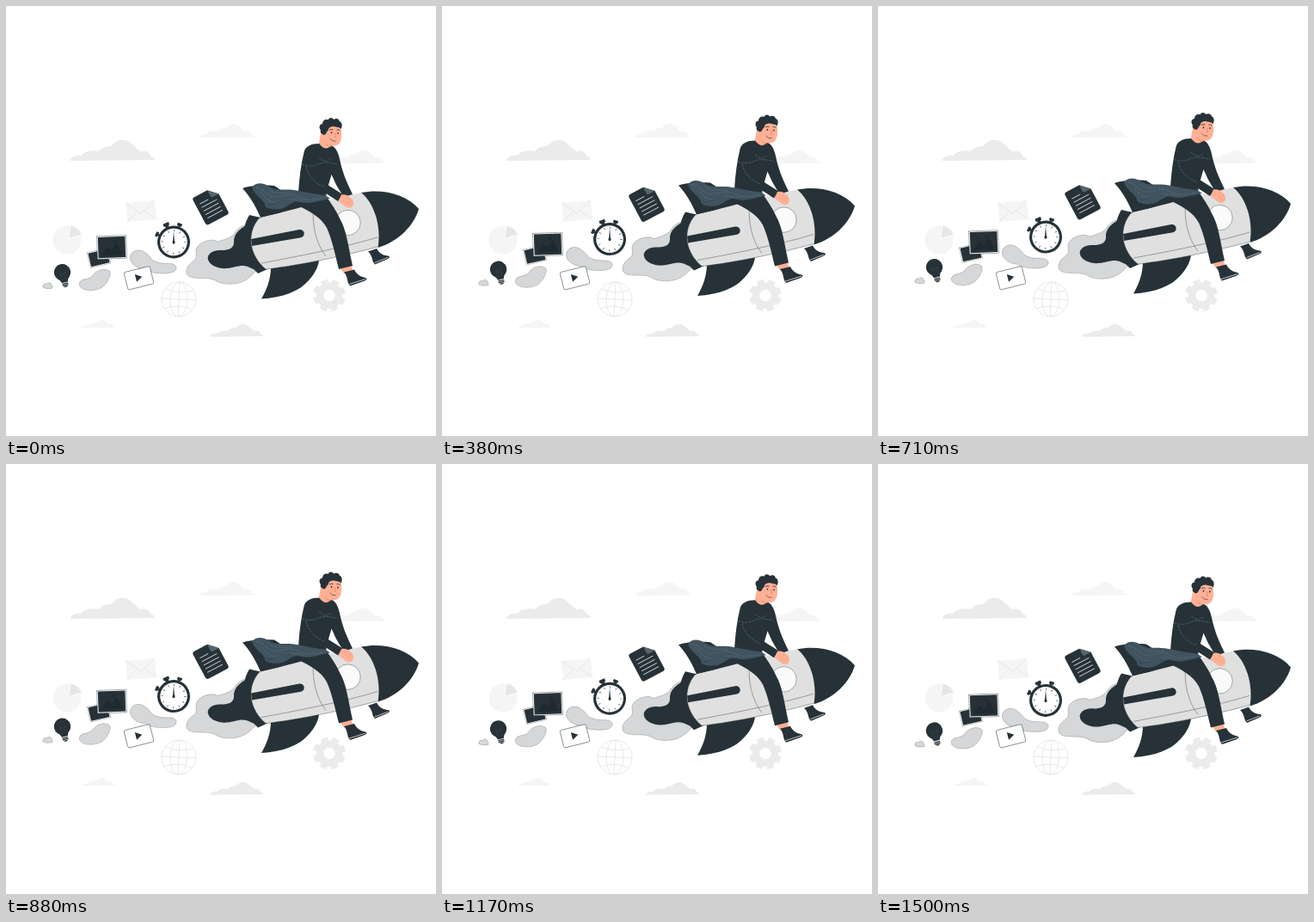
An HTML page for the animation above (1.54 s loop, 500x500 px).

```html
<!DOCTYPE html>
<html lang="en">
<head>
<meta charset="utf-8">
<title>Rocket ride</title>
<style>
  html, body { margin: 0; width: 100%; height: 100%; overflow: hidden; background: #fff; }
  svg { display: block; width: 100%; height: 100%; }
  .dark { fill: #263238; }
  .smoke { fill: #d6d7d8; stroke: #263238; stroke-width: .3; stroke-dasharray: 2 .6; }
  .body { fill: #e0e0e0; }
  .skin { fill: #ffb094; }
  .line { fill: none; stroke: #263238; stroke-width: .4; }
  .pale { fill: none; stroke: #fff; stroke-width: .7; }
  .seam { fill: none; stroke: #8b9ba3; stroke-width: .4; stroke-dasharray: 3 1.2; }
  .faint { fill: none; stroke: #e0e0e0; stroke-width: .7; }
</style>
</head>
<body>
<svg viewBox="0 0 500 500">
  <defs>
    <path id="cloud" d="M0 24C1 20 6 17 13 18C16 13 26 11 34 13C38 6 46 8 49 6C55-2 67-2 72 5C77 8 79 12 82 13C89 11 93 15 94 19C97 19 98 21 98 23Z"/>
  </defs>

  <g id="still">
    <use href="#cloud" transform="translate(74.5 156)" fill="#ebebeb"/>
    <use href="#cloud" transform="translate(224 137.2) scale(.66)" fill="#f5f5f5"/>
    <use href="#cloud" transform="translate(375 167.5) scale(.66)" fill="#f5f5f5"/>
    <use href="#cloud" transform="translate(88 365) scale(.39)" fill="#f5f5f5"/>
    <use href="#cloud" transform="translate(237 370) scale(.63 .61)" fill="#ebebeb"/>

    <circle cx="71" cy="272" r="16.5" fill="#f5f5f5"/>
    <path d="M72.5 270.5L75 255Q85 257 88.500 266Z" fill="#e6e6e6" stroke="#fff"/>

    <path d="M139 229L173 226L175 248L141 251Z" fill="#f5f5f5"/>
    <path class="faint" d="M139 229L157 241L173 226M141 251L153 238M175 248L161 238"/>

    <g class="faint" transform="translate(201 341) rotate(3)">
      <circle r="20"/>
      <ellipse rx="10" ry="20"/>
      <path d="M0-20V20M-20 0H20M-16.500-11.500Q0-5 16.500-11.500M-16.500 11.500Q0 5 16.500 11.500"/>
    </g>

    <g transform="translate(376 336.500) rotate(10)" fill="none" stroke="#ebebeb">
      <circle r="11" stroke-width="8.500"/>
      <circle r="16.200" stroke-width="5.200" stroke-dasharray="7.700 5.023"/>
    </g>
  </g>

  <g id="ride">
    <path class="smoke" d="M43 327C42.500 323 46 322 47.500 323.500C49 320 54 322 54 328C52 329 45 329 43 327Z"/>
    <path class="smoke" d="M86 321C89 316 97 319 101 313C106 306 117 304 121 309C122 314 118 322 112 327C104 332 90 332 86 326C85 324 85 322 86 321Z"/>
    <path class="smoke" d="M145 290C147 283 157 282 162 287C169 291 168 296 176 298C185 301 194 297 198 303C199 309 192 311 184 311C174 311 168 310 162 306C152 306 142 298 145 290Z"/>
    <path class="smoke" d="M290 252C278 253 270 257 266 264C262 270 252 272 246 274C240 270 227 273 222 281C219 286 224 291 219 296C209 302 207 312 214 315C222 318 236 315 243 319C252 325 268 324 276 320C284 316 288 311 292 306Z"/>

    <g transform="translate(65.500 309.700) rotate(-14)">
      <circle class="dark" r="9.700"/>
      <path class="dark" d="M-6 6L-3.500 12H3.500L6 6Z"/>
      <path class="line" d="M-3.500 13.500H3.500M-3.500 15.300H3.500M-2 17H2" style="stroke-width:1.300"/>
      <path class="seam" d="M-2 9L-3 0L0 3L3 0L2 9" opacity=".4"/>
    </g>

    <g transform="translate(108 293) rotate(-13)">
      <rect x="-12" y="-9" width="24" height="18" fill="#fff" stroke="#263238" stroke-width=".4" stroke-dasharray="1.200 .6"/>
      <rect class="dark" x="-11" y="-8" width="22" height="16"/>
    </g>
    <g transform="translate(123 280.500) rotate(-2)">
      <rect x="-17" y="-13.300" width="34" height="26.600" fill="#fff" stroke="#263238" stroke-width=".6" stroke-dasharray="1.400 .7"/>
      <rect class="dark" x="-15.800" y="-12.100" width="31.600" height="24.200"/>
      <g fill="#1f2a30">
        <path d="M-13 9L-5-1L0 4L6-5L13 9Z"/>
        <circle cx="3" cy="-6.500" r="1.800"/>
      </g>
    </g>

    <g class="dark" transform="translate(195 274.500) rotate(-23)">
      <path d="M-3.500-24H3.500V-20.500H2V-17H-2V-20.500H-3.500Z"/>
      <path id="knob" d="M-2.800-23H2.800V-19.800H1.300V-17H-1.300V-19.800H-2.800Z" transform="rotate(-42)"/>
      <use href="#knob" transform="rotate(84)"/>
      <circle r="19"/>
      <circle r="15.800" fill="#fff"/>
      <circle r="13.200" fill="none" stroke="#263238" stroke-width="2.500" stroke-dasharray=".6 6.311" transform="rotate(23)"/>
      <g transform="rotate(23)">
        <path d="M0-12.500L1.200 2H-1.200Z"/>
        <circle r="1.600"/>
      </g>
    </g>

    <g transform="translate(238 232.500) rotate(-28)">
      <path class="dark" d="M-12-18H5L15-8V15Q15 18 12 18H-12Q-15 18-15 15V-15Q-15-18-12-18Z"/>
      <path d="M5-18L15-8H7Q5-8 5-10Z" fill="#56656d"/>
      <path class="pale" d="M-10-8H1M-10-3.300H10M-10 1.400H10M-10 6.100H10M-10 10.800H10"/>
    </g>

    <!-- rocket -->
    <path class="dark" d="M275 212C285 208.500 300 208 312 209L350 234L296 246C290 232 284 222 275 212Z"/>
    <path class="dark" d="M308 303C308 318 303 330 297 340.500C322 339 341 332 352 319C360 310 364 302 364.500 291Z"/>
    <path class="dark" d="M289 251C273 256 264 265 265 275C265 282 258 284 251 284C240 283 233 289 235 295C237 302 248 306 257 305C267 304 273 300 281 303L292 308Z"/>
    <path class="dark" d="M283 243L296 246L304 306L293 311C276 296 270 264 283 243Z"/>
    <path class="body" d="M294 247C330 238 380 223 414 217C428 228 437 254 432.500 280C400 289 340 302 302 306C283 290 279 265 294 247Z"/>
    <path class="dark" d="M413 217C438 212 466 219 480 236C474 256 456 274 432.500 281C437 254 427 228 413 217Z"/>
    <path class="line" d="M297 299C340 291 392 281 432 269M358 231C355 252 360 276 372 291M294 247C279 265 283 290 302 306C340 302 400 289 432 280"/>
    <path class="dark" d="M285 271L341 260A4.700 4.700 0 0 1 343 269.200L286 279Z"/>
    <circle cx="397.500" cy="252" r="14.700" fill="#fafafa" stroke="#263238" stroke-width=".4"/>

    <!-- back foot -->
    <path class="dark" d="M421 285.500L431 282C434 288 439 290 444 290.500C447 291 446 293.500 443 294.500L429 300.500C425 297 427 291 421 285.500Z"/>
    <path class="pale" d="M428.500 298.500L444 292.500"/>

    <!-- rider -->
    <path class="skin" d="M388 303.500L401 300L403.500 308L393 311Z"/>
    <path class="dark" d="M338 219C333 223 333 228 339 232C352 238 366 245 373 258C379 271 383 290 387 306L403 302C398 280 396 260 388 247C384 238 378 229 372 221Z"/>
    <path class="dark" d="M393 309.500L405 306.500C408 313 413 315 418 316C420.500 317 419.500 319 416 320L400 325.500C396 321 398 315 393 309.500Z"/>
    <path class="pale" d="M399 323.500L418 317.500"/>

    <path class="skin" d="M366.500 145L379 152L380 168Q370 172 363 164Z"/>
    <path class="dark" d="M364 160C355 160 348 163 346.500 170C343 184 341 200 340 217L345 220L372 222L373.500 213L378.500 196C382 203 384 210 393 222L403 219C396 205 391 193 388 178C386 169 383 164 378 162Q372 170 364 160Z"/>

    <!-- cloth -->
    <path d="M286 211C291 204 300 206 306 210C313 215 321 213 329 213.500C341 214 352 218 371 220L377 224C362 227 352 231 342 228C332 225 328 235 318 236C308 237 300 235 301 230C296 222 289 220 286 211Z" fill="#40545f"/>
    <path d="M291 211C301 212 304 223 314 222S330 217 340 222S358 225 370 223M297 217C303 224 309 230 318 228S332 223 344 226M305 213C314 220 324 216 334 218" fill="none" stroke="#78909c" stroke-width=".7" stroke-dasharray=".8 1.500"/>
    <path d="M303 231C312 233 320 225 330 226" class="line"/>

    <path class="dark" d="M345 180C345 195 352 205 363 212L386 227L391.500 219L374 208C368 201 365 192 363 183Z"/>
    <path class="seam" d="M344 184Q354 188 362 184T386 184M364 176Q372 184 378 177M349 187C352 200 360 206 371 211"/>
    <path class="skin" d="M390 219.500C396 218 402 222 404 228C405 233 400 237 395 233.500L386.500 227Z"/>
    <path d="M394 226L401 231M396 223L403 228" fill="none" stroke="#e98f76" stroke-width=".5"/>

    <path class="skin" d="M367 144L374 138L389 140C391 150 390.500 157 386.500 161C382 164 375 163 371 159C366 155 365 150 367 144Z"/>
    <path d="M371 158C372 161 376 163 379 163.200C375 165 371 162 371 158Z" fill="#ee9478"/>
    <path class="dark" d="M370 150C367 149 364.500 147 366 144.500C363 141 365 137 368 137C368 133 372 131 374.500 132.500C376 129 380 129.500 381 132C384 130 388 131.500 387.500 134C391 135 391.500 140 389.500 143C388 140.500 384 141 381 140C378 140 375 141 375 144C374 145 372.500 147 372 148.500Z"/>
    <path class="line" d="M376 144.500Q378 142.700 380.500 144M384.500 144.200Q386.500 143.300 388.500 145" style="stroke-width:.8"/>
    <ellipse class="dark" cx="378.500" cy="147.300" rx=".8" ry="1.100"/>
    <ellipse class="dark" cx="386" cy="148" rx=".8" ry="1.100"/>
    <path d="M382.500 147.500L383.500 152.500L381.500 152.700" fill="none" stroke="#e2755f" stroke-width=".7"/>
    <path d="M376.500 154Q379 158 383.500 157" fill="none" stroke="#263238" stroke-width=".6"/>
  </g>

  <g transform="translate(154.500 316.300) rotate(-14)">
    <rect x="-15.500" y="-10.500" width="31" height="21" rx="2" fill="#fff" stroke="#263238" stroke-width=".5"/>
    <path class="dark" d="M-3.500-5.200L4-.5L-3.500 3.800Z"/>
  </g>
</svg>
<script>
  const LOOP = 1540, STEPS = 37, PEAK = 680, LIFT = 7;
  const ride = document.getElementById('ride');

  // Distance below the highest pose: a linear up-and-down bob.
  const drop = t => {
    const d = Math.abs(t - PEAK);
    return Math.min(d, LOOP - d) * LIFT / (LOOP / 2);
  };

  function draw(now) {
    const step = Math.min(STEPS - 1, Math.floor((now % LOOP + 5) * STEPS / LOOP));
    const y = drop(step * LOOP / STEPS) - drop(0);
    ride.setAttribute('transform', `translate(0 ${y.toFixed(3)})`);
  }

  function tick() {
    draw(performance.now());
    requestAnimationFrame(tick);
  }
  tick();
</script>
</body>
</html>
```
